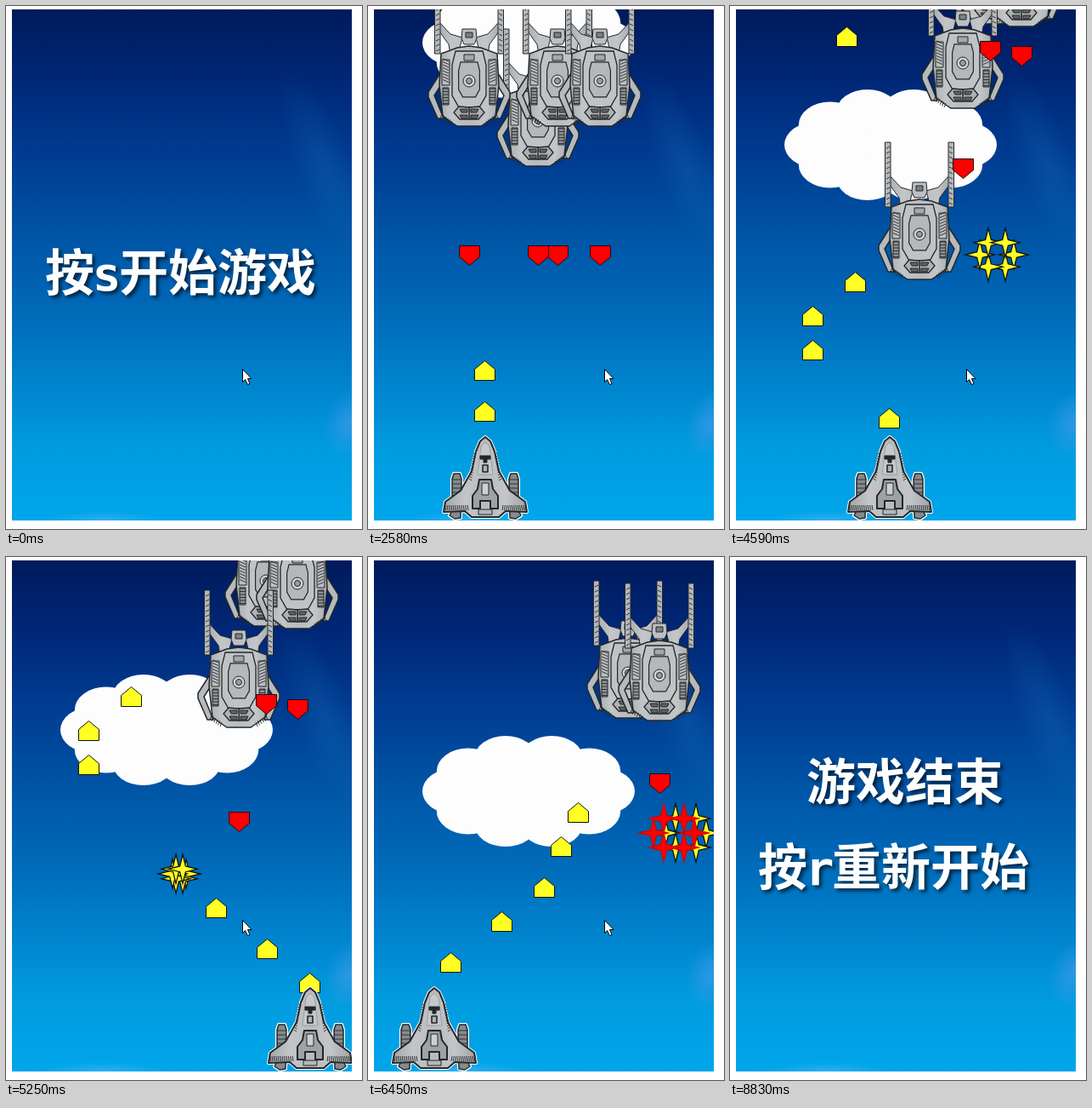
An HTML page with a canvas that plays this animation: 419x614 px, repeating every 9370 ms.

```html
<!DOCTYPE html>
<html lang="zh">
<head>
<meta charset="utf-8">
<style>
html, body { margin: 0; width: 100%; height: 100%; overflow: hidden; background: #fff; }
canvas { display: block; }
</style>
</head>
<body>
<canvas id="stage" width="419" height="614"></canvas>
<script>
const ctx = document.getElementById('stage').getContext('2d');
const LOOP = 9370, PLAY = 990, OVER = 7050, LEAVE = 8170, GONE = 8830;
const TICK = 134.5;   // ms between visible pictures of the game
const SUB = 4;        // game steps per tick
const INK = '#23272a', YELLOW = '#ffff22', RED = '#ff0000';

// Pixels per game step
const SHIP_V = 10, SHOT_V = 8, BOMB_V = 6, CLOUD_V = 2;
const DYING = 5, BURST_LIFE = 15;

// Player input: [step, x to fly to] and [first step, interval, shots]
const STOPS = [[0, 207], [25, 137], [54, 297], [72, 97], [98, 187], [112, 357], [129, 227], [149, 77]];
const VOLLEYS = [[39, 5.4, 3], [59.5, 5.2, 8], [106, 5.4, 1], [117, 5.4, 12]];

const FOES = [
  { x: 273, born: 1, v: 3 }, { x: 223, born: 1, v: 3 }, { x: 119, born: 1, v: 3 }, { x: 200, born: 1, v: 4 },
  { x: 274, born: 78, v: 4 }, { x: 343, born: 100, v: 3, reload: 43 }, { x: 306, born: 101, v: 3 },
  { x: 102, born: 144, v: 3 }
];

const fires = g => VOLLEYS.some(([start, gap, count]) => {
  const n = Math.floor((g - start) / gap);
  return n >= 0 && n < count && Math.ceil(start + n * gap) === g;
});

function advance(w, g) {
  w.g = g;
  const goal = STOPS.filter(s => g >= s[0]).pop()[1];
  w.ship += Math.max(-SHIP_V, Math.min(SHIP_V, goal - w.ship));

  w.foes = w.foes.filter(f => !f.hit || g < f.hit + DYING);
  for (const f of w.foes) if (!f.hit) f.y += f.v;
  for (const f of FOES) if (f.born === g) w.foes.unshift({ ...f, y: 0 });

  for (const b of w.bombs) b.y += BOMB_V;
  for (const f of w.foes) {
    if (!f.hit && (g === f.born || g === f.born + f.reload)) w.bombs.unshift({ x: f.x, y: f.y + 10 });
  }
  for (const s of w.shots) s.y -= SHOT_V;
  if (fires(g)) w.shots.push({ x: w.ship, y: 500 });

  const burst = (o, fill) => {
    o.used = true;
    w.bursts.push({ x: o.x + 17, y: o.y + 8, fill, start: g });
  };
  for (const s of w.shots) {
    const meets = (o, reach, depth) => Math.abs(s.x - o.x) < reach && s.y > o.y - depth;
    const bomb = w.bombs.find(b => !b.used && meets(b, 27, 40) && s.y <= b.y + 8);
    const foe = w.foes.find(f => meets(f, 48, 140) && s.y <= f.y);
    if (bomb || foe) burst(s, YELLOW);
    if (bomb) burst(bomb, RED);
    else if (foe) foe.hit = foe.hit || g;
  }
  w.shots = w.shots.filter(s => !s.used && s.y > -15);
  w.bombs = w.bombs.filter(b => !b.used && b.y < 620);
  w.bursts = w.bursts.filter(b => g - b.start < BURST_LIFE);
}

// The whole round is played once, so that any moment can be looked up
function playRound() {
  const w = { g: 0, ship: 207, foes: [], shots: [], bombs: [], bursts: [] };
  const ticks = [structuredClone(w)];
  for (let g = 1; g <= 46 * SUB; g++) {
    advance(w, g);
    if (g % SUB === 0) ticks.push(structuredClone(w));
  }
  return ticks;
}
const round = playRound();

function paint(fill, stroke = INK, width = 1) {
  if (fill) { ctx.fillStyle = fill; ctx.fill(); }
  if (stroke) { ctx.strokeStyle = stroke; ctx.lineWidth = width; ctx.stroke(); }
}

function poly(pts, fill, stroke, width) {
  ctx.beginPath();
  pts.forEach(([x, y]) => ctx.lineTo(x, y));
  ctx.closePath();
  paint(fill, stroke, width);
}

const flip = pts => pts.map(([x, y]) => [-x, y]);
const whole = half => half.concat(flip(half).reverse());
const box = (x, y, w, h) => [[x, y], [x + w, y], [x + w, y + h], [x, y + h]];

function both(pts, fill, stroke, width) {
  poly(pts, fill, stroke, width);
  poly(flip(pts), fill, stroke, width);
}

function disc(x, y, r, fill) {
  ctx.beginPath();
  ctx.arc(x, y, r, 0, 7);
  paint(fill);
}

// Evenly spaced strokes on both sides
function hatch(n, x, y, dx, dy, stepX, stepY) {
  ctx.beginPath();
  for (let i = 0; i < n; i++) {
    for (const side of [-1, 1]) {
      ctx.moveTo(side * (x + i * stepX), y + i * stepY);
      ctx.lineTo(side * (x + i * stepX + dx), y + i * stepY + dy);
    }
  }
  paint(null, INK, 0.9);
}

function at(x, y, draw) {
  ctx.save();
  ctx.translate(x, y);
  draw();
  ctx.restore();
}

function metal(w) {
  const g = ctx.createLinearGradient(-w, 0, w, 0);
  ['#a2a6a8', '#c3c6c8', '#b8bcbe', '#c3c6c8', '#a0a4a6'].forEach((c, i) => g.addColorStop(i / 4, c));
  return g;
}

function glow(x, y, rx, ry, turn, rgb, alpha) {
  at(x, y, () => {
    ctx.rotate(turn);
    ctx.scale(rx, ry);
    const g = ctx.createRadialGradient(0, 0, 0, 0, 0, 1);
    g.addColorStop(0, `rgba(${rgb},${alpha})`);
    g.addColorStop(1, `rgba(${rgb},0)`);
    ctx.fillStyle = g;
    ctx.fillRect(-1, -1, 2, 2);
  });
}

function sky() {
  const g = ctx.createLinearGradient(0, 4, 0, 604);
  ['#001a5c', '#002878', '#003c91', '#0052a4', '#0067b6', '#0080cb', '#009bdf', '#00a6ea']
    .forEach((c, i) => g.addColorStop(i / 7, c));
  ctx.fillStyle = g;
  ctx.fillRect(7, 4, 400, 600);
  glow(375, 190, 120, 34, 1.2, '20,110,185', 0.3);
  glow(404, 490, 28, 42, 0.3, '75,155,235', 0.6);
  glow(115, 604, 70, 11, 0, '80,180,245', 0.6);
}

function cloud(y) {
  const puff = (x, py, rx, ry) => {
    ctx.beginPath();
    ctx.ellipse(x, py, rx, ry, 0, 0, 7);
    paint('#fdfdfd', null);
  };
  puff(189, y, 96, 50);
  for (let i = 0; i < 10; i++) {
    const a = i * Math.PI / 5;
    puff(189 + 88 * Math.cos(a), y + 40 * Math.sin(a), 37, 27);
  }
}

// Star with n points; many-pointed ones are ragged
function star(x, y, r, n, inner, fill, stroke) {
  const pts = Array.from({ length: n * 2 }, (_, i) => {
    const a = i * Math.PI / n;
    const d = i % 2 ? r * inner : n > 4 ? r * (0.8 + 0.2 * Math.sin(i * 5)) : r;
    return [x + d * Math.sin(a), y - d * Math.cos(a)];
  });
  poly(pts, fill, stroke, 1.3);
}

function enemy() {
  const skin = metal(40);
  const hook = [[34, -62], [48, -40], [48, -34], [37, -9], [30, -9], [41, -36], [32, -50]];
  both([[8, -104], [22, -108], [35, -122], [35, -111], [24, -96], [22, -84], [12, -88]], skin);
  both(box(34, -161, 6.5, 76), '#b4b8ba');
  hatch(12, 35, -156, 4, 2, 0, 6);
  both(hook, '#b6babc', INK, 1.5);
  poly(whole([[0, -94], [14, -92], [33, -85], [35, -48], [31, -12], [20, -4], [14, 0]]), skin, INK, 1.5);
  poly(whole([[8, -114], [9, -103], [6, -96]]), '#bcc0c2');
  poly(box(-4, -110, 8, 6), '#7b8083');

  // side plates
  both(box(23, -78, 9, 30), '#b9bdbf');
  both(box(24, -45, 7, 20), '#8d9295');
  hatch(8, 24, -76, 7, -3, 0, 3.5);
  hatch(6, 24, -44, 7, 0, 0, 3.5);
  hatch(6, 32, -14, 2, 5, -2.4, 1.6);

  // nested plates around the core
  const plate = s => whole([[16, -34], [20, -18], [20, 18], [12, 32]].map(([x, y]) => [x * s, y * s - 54]));
  poly(plate(1), '#bfc3c5', INK, 1.3);
  poly(plate(0.62), '#b4b8ba', INK, 1.2);
  poly(box(-6, -84, 12, 7), '#a4a8ab');
  disc(0, -53, 7, '#cfd1d2');
  disc(0, -53, 3.5, '#989da0');

  // stern vents
  both([[0, -22], [12, -23], [18, -16], [11, -8], [0, -8]], '#aeb2b4', INK, 1.3);
  for (const y of [-20, -13]) both([[2, y], [11, y], [9, y + 4], [2, y + 4]], '#5e6366');
}

function drawFoe(f) {
  at(f.x, f.y, () => {
    ctx.globalAlpha = f.hit ? 0.86 : 1;
    enemy();
    if (!f.hit) return;
    for (const [x, y, r] of [[0, -50, 22], [16, -108, 16], [-33, -30, 13]]) {
      star(x, y, r, 11, 0.38, '#64696c', INK);
      star(x + 1, y + 1, r * 0.6, 7, 0.35, '#969a9d', INK);
    }
  });
}

function ship() {
  const hull = whole([[0, 506], [6, 511], [11, 523], [16, 546], [29, 569], [47, 582], [49, 594], [24, 593], [16, 600]]);
  const pod = [[28, 555], [30, 549], [37, 549], [39, 555], [39, 592], [42, 598], [36, 602], [29, 601]];
  ctx.lineJoin = 'round';
  poly(hull, '#fff', '#fff', 4);
  both(pod, '#fff', '#fff', 4);
  both(pod, '#858a8d', INK, 1.5);
  hatch(4, 28, 556, 11, 0, 0, 5);
  poly(hull, metal(48), INK, 2);
  hatch(11, 11, 527, 3, -2, 0.5, 3);
  hatch(12, 20, 592, 1, -6, 2.4, 0);
  poly(whole([[0, 512], [5, 517], [9, 550]]), '#c6c9cb', '#8b9093', 0.7);

  // cockpit, window and engine block
  poly(box(-6, 528, 12, 4), INK);
  poly(box(-2, 532, 4, 4), INK);
  poly(box(-3, 539, 6, 8), '#aeb2b4', INK, 1.6);
  poly(whole([[7, 556], [9, 567], [15, 575], [15, 590], [6, 590], [6, 581]]), '#9da2a5', INK, 2);
  poly(box(-4, 560, 8, 14), '#cdd0d1');
  poly(box(-8, 591, 16, 6), '#b4b8ba');
  ctx.lineJoin = 'miter';
}

// Pentagon pointing up for dir 1 and down for dir -1
function bullet({ x, y }, dir, fill) {
  const shape = whole([[0, -12], [12, -2], [12, 11]]);
  poly(shape.map(([a, b]) => [x + a + 0.5, y + b * dir + 0.5]), fill, '#111', 1);
}

function drawBurst({ x, y, fill, start }, g) {
  const r = Math.max(0, g - start - 1) * 2;
  for (let i = 0; i < 6; i++) {
    const a = i * Math.PI / 3;
    star(x + r * Math.cos(a), y + r * 0.82 * Math.sin(a), 17, 4, 0.28, fill, fill === RED ? '#d80000' : '#111');
  }
}

function game(w) {
  cloud(w.g * CLOUD_V - 53);
  w.foes.forEach(drawFoe);
  w.shots.forEach(s => bullet(s, 1, YELLOW));
  w.bombs.forEach(b => bullet(b, -1, RED));
  w.bursts.forEach(b => drawBurst(b, w.g));
  at(w.ship + 1, 0, ship);
}

function title(text, x, base) {
  ctx.save();
  ctx.textAlign = 'center';
  ctx.fillStyle = '#fdfffe';
  ctx.shadowColor = 'rgba(0,0,0,.65)';
  ctx.shadowBlur = 4;
  ctx.shadowOffsetX = ctx.shadowOffsetY = 3;
  for (const ch of text) {
    const latin = ch < '\x7f';
    const step = latin ? 29 : 58;
    ctx.font = latin ? 'bold 56px "DejaVu Sans Mono", monospace' : 'bold 58px "Noto Sans CJK SC", "Noto Sans CJK", sans-serif';
    ctx.fillText(ch, x + step / 2, base);
    x += step;
  }
  ctx.restore();
}

function pointer(x, y) {
  at(x + 0.5, y + 0.5, () =>
    poly([[0, 0], [0, 15], [3, 12], [6, 18], [8.5, 17], [6, 11], [10.5, 11]], '#fff', '#000', 1));
}

function render(t) {
  ctx.fillStyle = '#fff';
  ctx.fillRect(0, 0, 419, 614);
  ctx.save();
  ctx.beginPath();
  ctx.rect(7, 4, 400, 600);
  ctx.clip();
  sky();
  if (t < PLAY) title('按s开始游戏', 46, 334);
  else if (t < OVER) game(round[Math.min(44, Math.floor((t - PLAY) / TICK + 0.5))]);
  else {
    title('游戏结束', 90, 285);
    title('按r重新开始', 33, 385);
  }
  ctx.restore();
  if (t < LEAVE) pointer(278, 426);
  else if (t < GONE) {
    const p = Math.floor((t - LEAVE) / 132) / 4;
    pointer(272 + 73 * p ** 1.7, 448 + 150 * p);
  }
}

const began = performance.now();
function loop() {
  render((performance.now() - began) % LOOP);
  requestAnimationFrame(loop);
}
loop();
</script>
</body>
</html>
```
